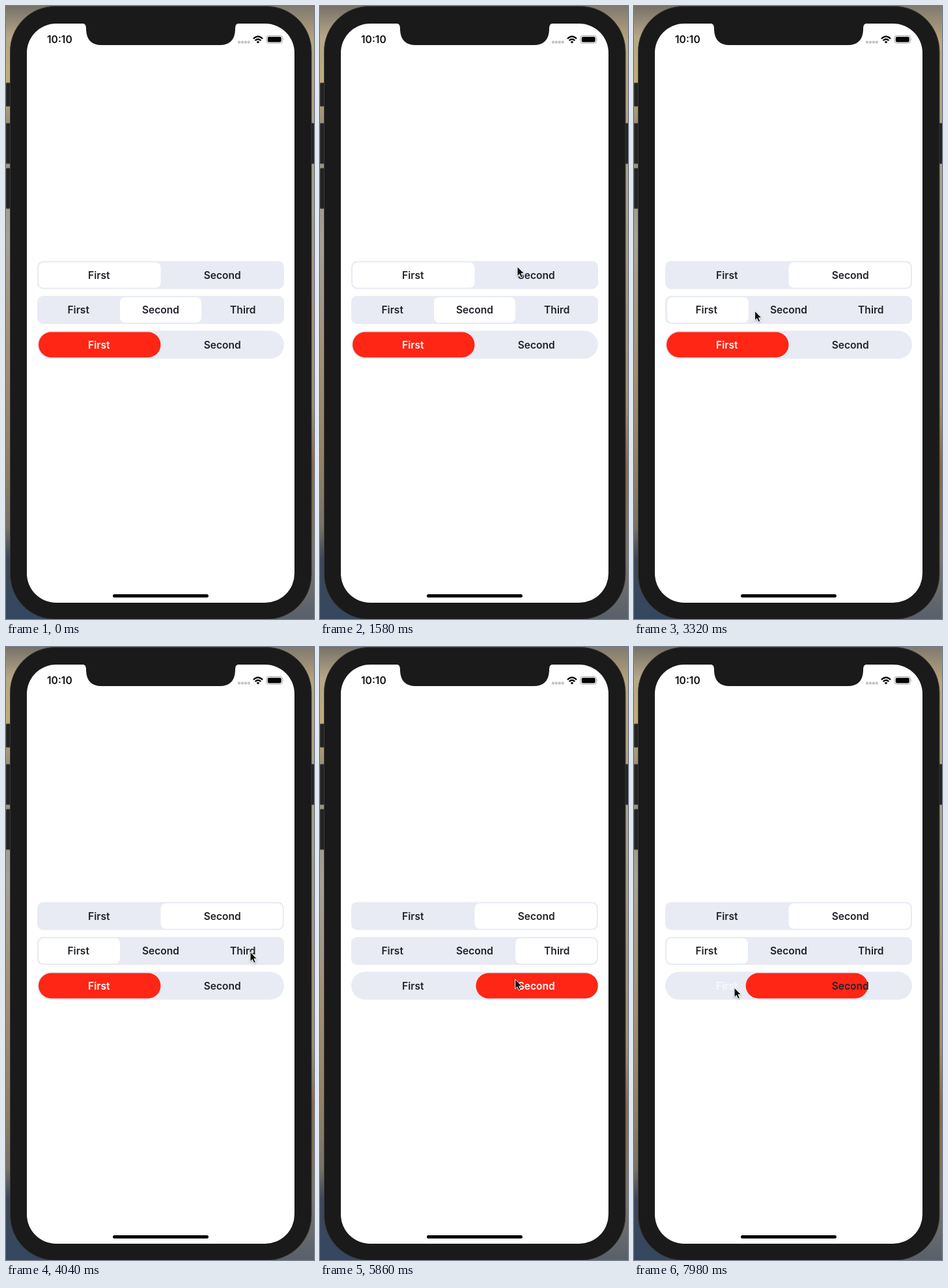
Write an HTML page that moves like this. It is 473 px wide and 941 px high and loops after 8000 ms.

```html
<!DOCTYPE html>
<html lang="en">
<head>
<meta charset="utf-8">
<title>Segmented controls</title>
<style>
  html, body { margin: 0; width: 100%; height: 100%; overflow: hidden; background: #fff; }
  svg { display: block; width: 100%; height: 100%; }
  text { font: 600 15.6px Inter, "Open Sans", sans-serif; fill: #212229; }
  .segments text { text-anchor: middle; }
  .track { fill: #e8ebf3; }
</style>
</head>
<body>
<svg viewBox="0 0 473 941" preserveAspectRatio="none">
  <defs>
    <linearGradient id="leftWall" x2="0" y2="1">
      <stop offset="0" stop-color="#777168"/>
      <stop offset=".05" stop-color="#b5a787"/>
      <stop offset=".12" stop-color="#c0ac77"/>
      <stop offset=".2" stop-color="#968d79"/>
      <stop offset=".38" stop-color="#a5a198"/>
      <stop offset=".6" stop-color="#a18d72"/>
      <stop offset=".76" stop-color="#8d8067"/>
      <stop offset=".85" stop-color="#777168"/>
      <stop offset=".9" stop-color="#3d4859"/>
      <stop offset="1" stop-color="#34475f"/>
    </linearGradient>
    <linearGradient id="rightWall" x2="0" y2="1">
      <stop offset="0" stop-color="#807a70"/>
      <stop offset=".06" stop-color="#bca77d"/>
      <stop offset=".3" stop-color="#aaa08d"/>
      <stop offset=".65" stop-color="#a58f70"/>
      <stop offset=".75" stop-color="#8b6c47"/>
      <stop offset=".9" stop-color="#7d766c"/>
      <stop offset="1" stop-color="#58606b"/>
    </linearGradient>
    <filter id="soft" x="-50%" y="-50%" width="200%" height="200%">
      <feDropShadow dx="0" dy="1" stdDeviation="1" flood-opacity=".35"/>
    </filter>
  </defs>

  <rect width="240" height="941" fill="url(#leftWall)"/>
  <rect x="240" width="233" height="941" fill="url(#rightWall)"/>

  <g fill="#232323" stroke="#4a4a48" stroke-width=".8">
    <rect x="0" y="118" width="9" height="36" rx="1.5"/>
    <rect x="0" y="180" width="9" height="62" rx="1.5"/>
    <rect x="0" y="249" width="9" height="62" rx="1.5"/>
    <rect x="466" y="180" width="8" height="62" rx="1.5"/>
  </g>

  <rect x="6.5" y="0.5" width="462.5" height="941" rx="69" fill="#1a1a1a" stroke="#383736"/>
  <rect x="32" y="27" width="411" height="889" rx="45" fill="#fff"/>
  <path fill="#1a1a1a" d="M116 26.5q7 0 7 7v3q1 23.5 24 23.5H328q23 0 24-23.5v-3q0-7 7-7z"/>

  <text x="63" y="57" style="fill:#111">10:10</text>
  <g fill="#c3c3c5">
    <rect x="356" y="53.5" width="4" height="4" rx="1"/>
    <rect x="360.9" y="53.5" width="4" height="4" rx="1"/>
    <rect x="365.8" y="53.5" width="4" height="4" rx="1"/>
    <rect x="370.7" y="53.5" width="4" height="4" rx="1"/>
  </g>
  <g fill="none" stroke="#050505" stroke-width="2.3">
    <path d="M380 50.2q7-6.8 14 0"/>
    <path d="M382.6 53q4.4-4.1 8.8 0"/>
    <path d="M384.6 54.9q2.4-2 4.8 0L387 57.4z" fill="#050505" stroke="none"/>
  </g>
  <rect x="400" y="45.5" width="24.6" height="11.6" rx="3.4" fill="none" stroke="#a3a3a5"/>
  <rect x="401.8" y="47.2" width="21" height="8.2" rx="1.8" fill="#050505"/>
  <path d="M425.8 49.3q1.6 2 0 4z" fill="#a3a3a5"/>
  <rect x="164" y="903" width="147" height="5" rx="2.5" fill="#050505"/>

  <g id="controls"></g>

  <path id="cursor" filter="url(#soft)" fill="#080808" stroke="#fff" stroke-width="1" stroke-linejoin="round"
        d="M0 0V14.8L3.3 11.7L5.7 17.1L8.4 15.9L6 10.7H10.6Z"/>
</svg>

<script>
const LOOP = 8000;
const LEFT = 48, WIDTH = 379, INSET = 2;

// Each tap is [release time, segment].
const controls = [
  { top: 391.5, labels: ["First", "Second"], start: 0, taps: [[1990, 1]], trackR: 9, thumbR: 8 },
  { top: 445, labels: ["First", "Second", "Third"], start: 1,
    taps: [[2950, 0], [4450, 2], [6800, 0]], trackR: 9, thumbR: 8 },
  { top: 498.5, labels: ["First", "Second"], start: 0,
    taps: [[5380, 1], [7880, 0]], trackR: 21.5, thumbR: 19.5, tint: "#ff2615" },
];

// Pointer stops: [time, x, y]
const stops = [
  [900, 485, 640], [1500, 303, 400], [2080, 303, 400], [2480, 150, 463],
  [2750, 116, 468], [3100, 116, 468], [3750, 375, 468], [4540, 375, 468],
  [4900, 353, 522], [5600, 353, 522], [6450, 116, 469], [6980, 116, 469],
  [7500, 154, 523], [8000, 154, 523],
];

const clamp = v => Math.min(1, Math.max(0, v));
const mix = (a, b, k) => a + (b - a) * k;
const smooth = k => k * k * (3 - 2 * k);

function spring(ms, response = 0.55, damping = 0.825) {
  if (ms <= 0) return 0;
  const t = ms / 1000, w = 2 * Math.PI / response;
  const root = Math.sqrt(1 - damping * damping), wd = w * root;
  return 1 - Math.exp(-damping * w * t) * (Math.cos(wd * t) + damping / root * Math.sin(wd * t));
}

function add(parent, name, attrs) {
  const el = document.createElementNS(parent.namespaceURI, name);
  for (const key in attrs) el.setAttribute(key, attrs[key]);
  return parent.appendChild(el);
}

for (const c of controls) {
  const group = add(document.getElementById("controls"), "g", { class: "segments" });
  const count = c.labels.length;
  c.step = (WIDTH - 2 * INSET) / count;
  add(group, "rect", { class: "track", x: LEFT, y: c.top, width: WIDTH, height: 43, rx: c.trackR });
  c.thumb = add(group, "rect", {
    y: c.top + INSET, width: c.step, height: 39, rx: c.thumbR, fill: c.tint || "#fff",
  });
  c.texts = c.labels.map((label, i) => {
    const el = add(group, "text", { x: LEFT + WIDTH * (i + 0.5) / count, y: c.top + 27.3 });
    el.textContent = label;
    return el;
  });
}

// Labels dim while pressed and recover after release.
function pressOpacity(ms) {
  if (ms < -100 || ms > 250) return 1;
  return ms < 0 ? 0.5 : mix(0.5, 1, ms / 250);
}

function drawControl(c, time) {
  let position = c.start, selected = c.start;
  const opacity = c.texts.map(() => 1);
  for (const [at, segment] of c.taps) {
    position += (segment - selected) * spring(time - at) * (time >= at);
    if (time >= at) selected = segment;
    opacity[segment] = Math.min(opacity[segment], pressOpacity(time - at));
  }
  c.thumb.setAttribute("x", LEFT + INSET + position * c.step);
  c.texts.forEach((el, i) => {
    el.style.fill = c.tint && i === selected ? "#fff" : "";
    el.style.opacity = opacity[i];
  });
}

const cursor = document.getElementById("cursor");

function drawCursor(time) {
  cursor.style.display = time < stops[0][0] ? "none" : "";
  const next = Math.max(1, stops.findIndex(s => s[0] > time));
  const [t0, x0, y0] = stops[next - 1], [t1, x1, y1] = stops[next];
  const k = smooth(clamp((time - t0) / (t1 - t0)));
  cursor.setAttribute("transform", `translate(${mix(x0, x1, k)} ${mix(y0, y1, k)})`);
}

function frame(now) {
  const time = now % LOOP;
  controls.forEach(c => drawControl(c, time));
  drawCursor(time);
}

const begin = performance.now();
function tick() {
  frame(performance.now() - begin);
  requestAnimationFrame(tick);
}
tick();
</script>
</body>
</html>
```
